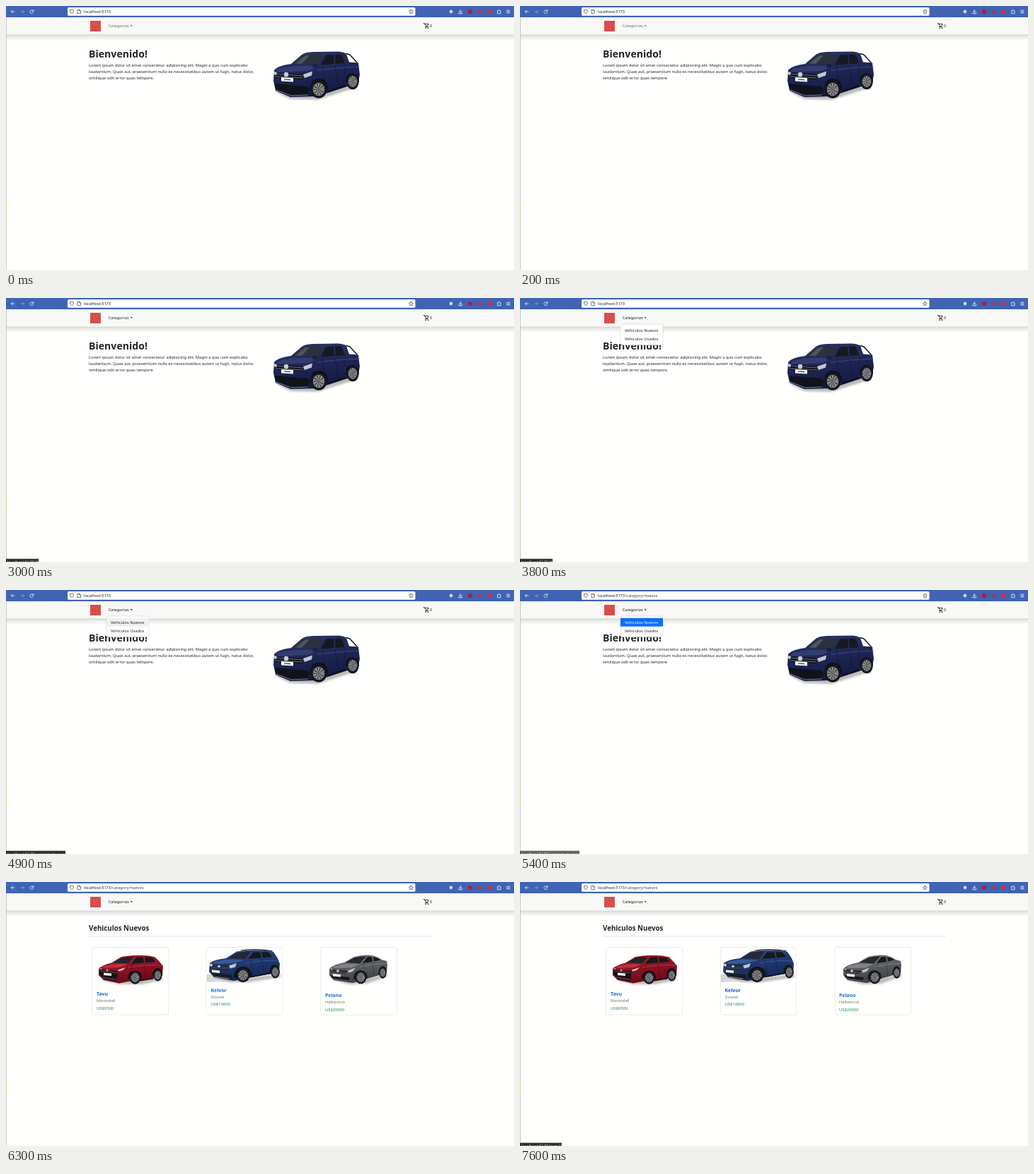
An HTML page that plays this animation: 718 by 374 pixels, repeating every 8 s.

```html
<!DOCTYPE html>
<html lang="es">
<head>
<meta charset="utf-8">
<title>Vehiculos</title>
<style>
  html, body { margin: 0; width: 718px; height: 374px; overflow: hidden; background: #fffffd; }
  svg { display: block; }
  text { font: 5.74px "Noto Sans", "Open Sans", sans-serif; fill: #212529; white-space: pre; }
  .url, .status text { font-size: 5.62px; }
  .url { fill: #15141a; }
  .path { fill: #3c3c44; }
  .h1 { font-size: 14.1px; font-weight: 600; }
  .h3 { font-size: 9.75px; font-weight: 600; }
  .model { font-size: 6.9px; font-weight: 600; fill: #1a6fe0; }
  .brand { font-size: 5.6px; font-weight: 500; fill: #6c757d; }
  .price { font-size: 5.85px; fill: #198754; }
  .item { font-size: 5.78px; }
  .line { fill: none; stroke-linecap: round; stroke-linejoin: round; }
  .card { fill: #fffffd; stroke: #dcdcda; stroke-width: .6; }
  .glass { fill: #17191e; }
  .lamp { fill: #c3c8d1; }
  .plate { fill: #f3f4f5; }
  .cast { fill: #555; opacity: .4; filter: url(#soft); }
  .status rect { fill: #2c2c30; }
  .status text { fill: #e4e4e4; }

  .anim, .anim * { animation: 8s step-end infinite; }
  .home { animation-name: home; }
  .list { animation-name: list; }
  .menu { animation-name: menu; }
  .menu .hover { animation-name: hover; }
  .menu .press { animation-name: press; }
  .menu .first { animation-name: first; }
  .nav { animation-name: nav; }
  .path { animation-name: path; }
  .s1 { animation-name: s1; }
  .s2 { animation-name: s2; }
  .s3 { animation-name: s3; }
  .s4 { animation-name: s4; }
  .s5 { animation-name: s5; }
  .link1 { animation-name: link1; }
  .link2 { animation-name: link2; }

  @keyframes home { 0% { opacity: 1 } 68.75% { opacity: 0 } }
  @keyframes list { 0% { opacity: 0 } 68.75% { opacity: 1 } }
  @keyframes path { 0% { opacity: 0 } 67.5% { opacity: 1 } }
  @keyframes menu { 0% { opacity: 0 } 43.75% { opacity: 1 } 68.75% { opacity: 0 } }
  @keyframes hover { 0% { opacity: 0 } 51.25% { opacity: 1 } 66.25% { opacity: 0 } }
  @keyframes press { 0% { opacity: 0 } 66.25% { opacity: 1 } }
  @keyframes first { 0% { fill: #212529 } 66.25% { fill: #fff } }
  @keyframes nav { 0% { fill: #6d6d6c } 33.75% { fill: #444 } 35% { fill: #2a2a2a } 43.75% { fill: #191919 } }
  @keyframes s1 { 0% { opacity: 0 } 26.25% { opacity: .8 } 27.5% { opacity: 1 } 33.75% { opacity: 0 } }
  @keyframes s2 { 0% { opacity: 0 } 33.75% { opacity: 1 } 51.25% { opacity: 0 } }
  @keyframes s3 { 0% { opacity: 0 } 51.25% { opacity: 1 } 67.5% { opacity: .75 } 68.75% { opacity: 0 } }
  @keyframes s4 { 0% { opacity: 0 } 83.75% { opacity: .75 } 85% { opacity: 1 } 95% { opacity: 0 } }
  @keyframes s5 { 0% { opacity: 0 } 95% { opacity: 1 } }
  @keyframes link1 { 0% { fill: #1a6fe0 } 85% { fill: #0a58ca } 95% { fill: #1a6fe0 } }
  @keyframes link2 { 0% { fill: #1a6fe0 } 95% { fill: #0a58ca } }
</style>
</head>
<body>
<svg width="718" height="374" viewBox="0 0 718 374">
  <defs>
    <linearGradient id="shade" x2="0" y2="1">
      <stop stop-opacity=".16"/><stop offset=".5" stop-opacity=".06"/><stop offset="1" stop-opacity="0"/>
    </linearGradient>
    <linearGradient id="navy" x2=".3" y2="1"><stop stop-color="#2b3568"/><stop offset="1" stop-color="#151a44"/></linearGradient>
    <linearGradient id="red" x2=".3" y2="1"><stop stop-color="#b01c30"/><stop offset="1" stop-color="#6e0a18"/></linearGradient>
    <linearGradient id="blue" x2=".3" y2="1"><stop stop-color="#2b4a86"/><stop offset="1" stop-color="#15285a"/></linearGradient>
    <linearGradient id="grey" x2=".3" y2="1"><stop stop-color="#77787c"/><stop offset="1" stop-color="#414246"/></linearGradient>
    <linearGradient id="floor"><stop stop-color="#bbb" stop-opacity=".7"/><stop offset="1" stop-color="#ddd" stop-opacity="0"/></linearGradient>
    <filter id="soft" x="-20%" y="-80%" width="140%" height="260%"><feGaussianBlur stdDeviation="1.5"/></filter>
    <g id="wheel">
      <circle r="10" fill="#17181b"/>
      <circle r="7" fill="#36383c"/>
      <circle r="4" fill="none" stroke="#95979c" stroke-width="5" stroke-dasharray="1.5 1.01"/>
      <circle r="6.8" fill="none" stroke="#85878c" stroke-width=".8"/>
      <circle r="1.7" fill="#696b70"/>
    </g>
  </defs>

  <rect width="718" height="374" fill="#fffffd"/>

  <g class="anim">
    <g class="home">
      <text class="h1" x="117" y="73">Bienvenido!</text>
      <text x="117" y="86">Lorem ipsum dolor sit amet consectetur adipisicing elit. Magni a quo cum explicabo</text>
      <text x="117" y="95">laudantium. Quae aut, praesentium nulla ex necessitatibus autem ut fugit, natus dolor,</text>
      <text x="117" y="104">similique odit error quas tempore.</text>

      <!-- pickup -->
      <path class="cast" d="M380 121L402 132L440 133L497 115V110L440 122Z"/>
      <path d="M379 91Q384 84.500 403 82L418 69Q422 65.500 434 65L470 64.500Q478 65 481 68L485 79.500L498 80.500L500 97L498 109L458 122L440 128L402 129L381 120L378 106Z" fill="url(#navy)"/>
      <path d="M405 82L420 69.500Q434 67 448 68L440 83Z" fill="#2c323c"/>
      <path d="M409 81.500L422 70.500L429 70L418 82Z" fill="#4c5560"/>
      <path class="glass" d="M445 83.500L452 69.500L463 68.500L464 82ZM466 82L465 68.500L474 68.500L479 81Z"/>
      <path d="M481 67.500L486 69L496 80" class="line" stroke="#15171d" stroke-width="1.500"/>
      <path d="M383 90Q402 82.500 440 85L429 92L384 94Z" fill="#323c70"/>
      <path d="M440 91Q470 87 499 86" class="line" stroke="#46528c" stroke-width=".8"/>
      <path d="M447 86L452 118M465 85L470 113M480 83L479 97" class="line" stroke="#0e1230" stroke-width=".6"/>
      <path d="M456 121L479 113" class="line" stroke="#0c0e18" stroke-width="2"/>
      <path d="M380 94L421 97L419 104L380 101Z" fill="#10121b"/>
      <path d="M381 96L420 99M381 99.500L419 102" class="line" stroke="#aab0ba" stroke-width=".6"/>
      <path class="lamp" d="M420 97L433 92.500L432 98.500L422 102ZM379 93L383 94L382 98L379 97Z"/>
      <path d="M380 110L427 114L430 119L424 127H402L382 119Z" fill="#11131c"/>
      <path d="M382 119L403 127L426 126" class="line" stroke="#9399a4" stroke-width=".8"/>
      <circle cx="396" cy="97" r="3.200" fill="#c9cdd5"/>
      <path class="plate" d="M389 101L406 102V107.500L389 106.500Z"/>
      <path d="M393 104L402 104.700" stroke="#333" stroke-width="1.200"/>
      <path d="M434 82H440V87H433Z" fill="#1a2045"/>
      <path d="M430 119Q430 103 443 103Q455 104 455 119ZM480 108Q480 95 490 95Q499 96 499 108Z" fill="#0c0e18"/>
      <use href="#wheel" transform="translate(442 118) scale(1.150 1.280)"/>
      <use href="#wheel" transform="translate(490 107) scale(.880 1.120)"/>
    </g>

    <g class="list">
      <text class="h3" x="117" y="68.500">Vehiculos Nuevos</text>
      <path d="M117 77H602" stroke="#d9d9d8" stroke-width=".7"/>
      <rect class="card" x="121.500" y="92.500" width="108" height="95.500" rx="2.200"/>
      <rect class="card" x="283.200" y="92.500" width="107.700" height="95.500" rx="2.200"/>
      <rect class="card" x="445" y="92.500" width="107.500" height="95.500" rx="2.200"/>

      <!-- hatchback -->
      <path class="cast" d="M133 138L160 145L192 145L221 139V134L180 139Z"/>
      <path d="M131 123Q135 118 149 114.500L163 106Q172 104 188 103.700Q204 104 211 106.500L217 113L222 119L221 133L196 139L172 141L160 143.500L138 139L131 132Z" fill="url(#red)"/>
      <path d="M151 114.500L164 107Q172 105.500 181 105.500L173 115.500Z" fill="#22252b"/>
      <path class="glass" d="M177 116L184 106.500L194 106L195 114.500ZM197 114.500L196 106Q204 106 208 108L211 113Z"/>
      <path d="M136 120Q153 114.500 172 116.500L161 121L138 122Z" fill="#bd2f41"/>
      <path d="M173 121Q198 116.500 221 118" class="line" stroke="#c53f50" stroke-width=".7"/>
      <path d="M195 116L198 136M178 117V123" class="line" stroke="#4d0510" stroke-width=".6"/>
      <path d="M190 139.500L208 136.500" class="line" stroke="#1b1216" stroke-width="1.800"/>
      <path d="M132 124L158 126.500L156 140L138 137L132 131Z" fill="#1b1216"/>
      <path d="M133 126L157 128.500M136 135L155 138" class="line" stroke="#84868c" stroke-width=".6"/>
      <path class="lamp" d="M158 124.500L169 121L165 125L159 126.500ZM132 122.500L136 122.500L134 124Z"/>
      <path class="plate" d="M138 128.500L149 129.500V133L138 132Z"/>
      <circle cx="143" cy="125" r="1.500" fill="#c9a34a"/>
      <path d="M172 137Q173 125.500 183 125.500Q192 126 192 137ZM207 132Q208 122 215 122Q221 123 221 132Z" fill="#18080b"/>
      <use href="#wheel" transform="translate(182.500 135.500) scale(.800 .920)"/>
      <use href="#wheel" transform="translate(214.500 132) scale(.600 .850)"/>
      <text class="model link1" x="128" y="160.500">Tavu</text>
      <text class="brand" x="128" y="169.600">Marandell</text>
      <text class="price" x="128" y="180.500">US$9500</text>

      <!-- off-roader -->
      <path d="M284 131H330V141.700H284Z" fill="url(#floor)"/>
      <path class="cast" d="M289 135L316 142H342L388 135V130L340 136Z"/>
      <path d="M288 115Q293 110 311 108L326 98.500Q340 96 357 96.500Q372 96.500 378 99L384 108L387 116L386 128L350 134.500L322 140L294 135L287 127Z" fill="url(#blue)"/>
      <path d="M313 108L327 100Q337 98 346 98.500L338 109Z" fill="#242932"/>
      <path class="glass" d="M342 109L349 99.500L359 99L361 107.500ZM363 107.500L361 99L371 99.500L376 106Z"/>
      <path d="M332 97Q352 94 376 97.500" class="line" stroke="#23262d" stroke-width="1.200"/>
      <path d="M293 113.500Q312 107.500 337 111L320 115L294 116Z" fill="#395994"/>
      <path d="M339 115Q362 110 386 112" class="line" stroke="#4868a2" stroke-width=".7"/>
      <path d="M346 111L350 131M361 109L365 129" class="line" stroke="#0d1c44" stroke-width=".6"/>
      <path d="M289 117L315 119L313 125L289 122Z" fill="#161a22"/>
      <path d="M290 118.500L314 121M290 121L313 123" class="line" stroke="#868c96" stroke-width=".6"/>
      <path class="lamp" d="M315 118.500L326 115L324 120.500L317 122.500ZM288 116L292 116L291 120L288 119Z"/>
      <path d="M288 128L318 131L321 138L300 136Z" fill="#191c22"/>
      <path d="M296 134.500L315 137" class="line" stroke="#999ca3" stroke-width="1"/>
      <path d="M348 134L374 129" class="line" stroke="#15181f" stroke-width="2.200"/>
      <path class="plate" d="M291 124.500L302 125.500V129L291 128Z"/>
      <circle cx="301" cy="119.500" r="1.800" fill="#c6cad1"/>
      <path d="M322 136Q322 120 336 120Q348 121 348 135ZM372 130Q373 117 380 117Q386 118 387 129Z" fill="#10131a"/>
      <use href="#wheel" transform="translate(335 132) scale(.950 1.020)"/>
      <use href="#wheel" transform="translate(380.500 127.500) scale(.620 .900)"/>
      <text class="model link2" x="289.500" y="155.600">Kelvor</text>
      <text class="brand" x="289.500" y="164.500">Dostrel</text>
      <text class="price" x="289.500" y="175.300">US$10000</text>

      <!-- sedan -->
      <path class="cast" d="M459 138L485 145L510 144L539 134V130L500 138Z"/>
      <path d="M457 123Q462 117 478 114L492 106Q502 103 513 103.500Q524 104.500 531 110L538 112L539 117L538 129L510 137L490 143L463 139L457 132Z" fill="url(#grey)"/>
      <path d="M480 114L493 107Q502 105 509 105.500L500 115.500Z" fill="#27292e"/>
      <path class="glass" d="M504 115L511 106L517 106L518 113ZM520 112.500L519 106Q525 107 529 110.500Z"/>
      <path d="M462 120Q480 114 500 116.500L488 121.500L464 122Z" fill="#818286"/>
      <path d="M501 120Q520 115.500 538 115.500" class="line" stroke="#929397" stroke-width=".7"/>
      <path d="M518 115L520 134M505 117V122" class="line" stroke="#2a2b2e" stroke-width=".5"/>
      <path d="M458 124L482 126L481 130L459 127.500ZM458 132L486 135L484 141L463 138Z" fill="#17181b"/>
      <path d="M459 126L482 128.500M461 137L484 140" class="line" stroke="#a4a6ab" stroke-width=".6"/>
      <path class="lamp" d="M483 125.500L494 121.500L490 126.500L485 128.500ZM458 123L462 123L460 125Z"/>
      <path class="plate" d="M462 130L473 131V134.500L462 133.500Z"/>
      <circle cx="469" cy="126" r="1.800" fill="#c9cbd0"/>
      <path d="M491 138Q491 125 502 125Q511 126 511 137ZM526 131Q527 119 533 119Q538 120 538 129Z" fill="#1b1c1f"/>
      <use href="#wheel" transform="translate(501.500 135) scale(.800 .930)"/>
      <use href="#wheel" transform="translate(532.500 128.500) scale(.520 .820)"/>
      <text class="model" x="451" y="162.800">Pelano</text>
      <text class="brand" x="451" y="171.700">Halbenrick</text>
      <text class="price" x="451" y="182.700">US$20000</text>
    </g>
  </g>

  <!-- navigation bar -->
  <rect y="40" width="718" height="10" fill="url(#shade)"/>
  <rect y="15" width="718" height="25.300" fill="#f8f8f6"/>
  <rect x="119" y="21" width="15" height="15" fill="#d64f4b"/>
  <g class="anim">
    <text class="nav" x="144.700" y="30.300">Categorias</text>
    <path class="nav" d="M175.400 27.300H178.800L177.100 29Z"/>
  </g>
  <g class="line" stroke="#1c1c1c" stroke-width=".85">
    <path d="M590.300 24.500H591.500L593.400 28.500H596L597.200 25.500H592M593.400 28.500L592.600 29.900H597"/>
    <path d="M593.200 31.500h.1M596.500 31.500h.1" stroke-width="1.300"/>
  </g>
  <text x="598.900" y="30.300">0</text>

  <g class="anim">
    <g class="menu">
      <rect x="142" y="37" width="60" height="29.500" rx="2.200" fill="#fffffd" stroke="#d2d2d0" stroke-width=".6"/>
      <rect class="hover" x="142.300" y="39.700" width="59.400" height="12" fill="#eff0f1"/>
      <rect class="press" x="142" y="39.700" width="60" height="12" fill="#0d6efd"/>
      <text class="item first" x="148" y="47.700">Vehiculos Nuevos</text>
      <text class="item" x="148" y="59.700">Vehiculos Usados</text>
    </g>
  </g>

  <!-- browser toolbar -->
  <rect width="718" height="16" fill="#4063b3"/>
  <rect x="87" y="2" width="491.500" height="11.800" rx="1.600" fill="#fff"/>
  <g class="line" stroke="#f4f6fc" stroke-width=".8">
    <path d="M12 8H7.300M9.300 6L7.300 8L9.300 10"/>
    <path d="M20.800 8H25.500M23.500 6L25.500 8L23.500 10" opacity=".4"/>
    <path d="M38.400 7A2.400 2.400 0 1 0 38.600 8.800M38.800 5.300V7.200H36.900"/>
    <path d="M642.300 5.300V9M640.600 7.400L642.300 9.100L644 7.400M639.800 9.500V10.800H644.800V9.500"/>
    <path d="M694.500 6.900H696V6.200A.9 .9 0 0 1 697.800 6.200V6.900H699.200V10.600H694.500V9.400A.9 .9 0 0 0 694.500 7.700Z"/>
    <path d="M707.700 6.200H712M707.700 8H712M707.700 9.800H712"/>
  </g>
  <circle cx="629" cy="8" r="2.400" fill="#cdd6ee"/>
  <circle cx="656" cy="8" r="2.800" fill="#c4132b"/>
  <circle cx="669.500" cy="8" r="2.600" fill="#a23a5c"/>
  <circle cx="683" cy="8" r="2.900" fill="#d8303a"/>
  <g class="line" stroke="#3b3b42" stroke-width=".7">
    <path d="M93 5.200L95.500 6.100Q95.600 9.500 93 10.900Q90.400 9.500 90.500 6.100Z"/>
    <path d="M101.300 5.300H103.800L105.400 6.900V10.700H101.300ZM103.800 5.300V6.900H105.400"/>
    <path d="M572.500 5.200L573.350 7.050L575.350 7.300L573.900 8.700L574.250 10.700L572.500 9.700L570.750 10.700L571.100 8.700L569.650 7.300L571.650 7.050Z"/>
  </g>
  <text class="url" x="110" y="10">localhost:5173</text>
  <g class="anim"><text class="url path" x="148.200" y="10">/category/nuevos</text></g>

  <!-- window edge and link preview -->
  <rect y="16" width=".8" height="358" fill="#b9bcc2"/>
  <rect y="278" width=".8" height="28" fill="#d3d18f"/>
  <g class="anim">
    <g class="status s1"><rect y="369.500" width="40" height="6"/><text x="1.800" y="375.800">localhost:5173</text></g>
    <g class="status s2"><rect y="369.500" width="46" height="6"/><text x="1.800" y="375.800">localhost:5173/#</text></g>
    <g class="status s3"><rect y="369.500" width="84" height="6"/><text x="1.800" y="375.800">localhost:5173/category/nuevos</text></g>
    <g class="status s4"><rect y="369.500" width="59" height="6"/><text x="1.800" y="375.800">localhost:5173/item/1</text></g>
    <g class="status s5"><rect y="369.500" width="59" height="6"/><text x="1.800" y="375.800">localhost:5173/item/2</text></g>
  </g>
</svg>
</body>
</html>
```
